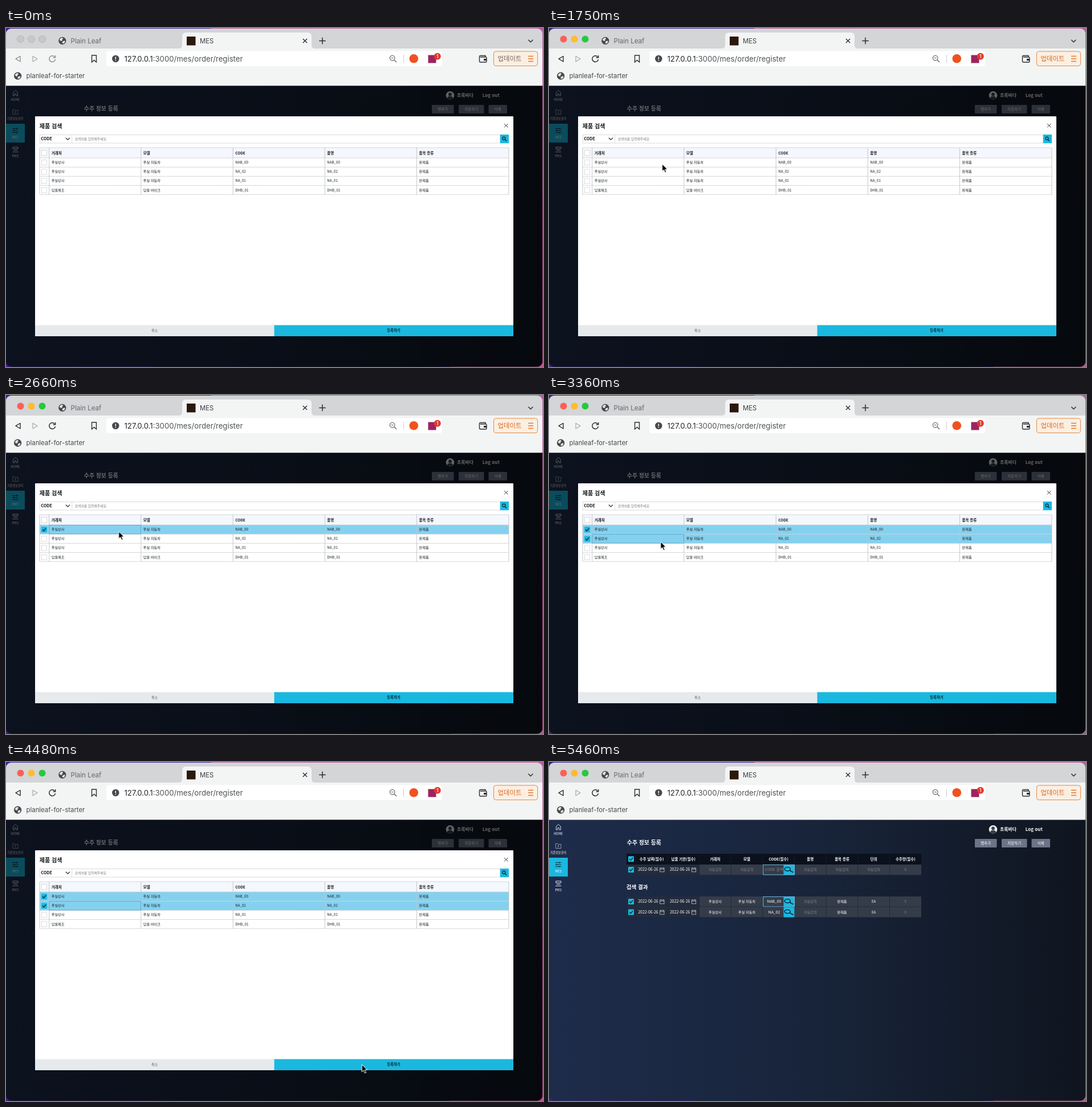
Write an HTML page that moves like this. It is 942 px wide and 595 px high and loops after 5.53 s.

```html
<!DOCTYPE html>
<html lang="ko">
<head>
<meta charset="utf-8">
<title>MES</title>
<style>
  html, body { margin: 0; width: 100%; height: 100%; overflow: hidden; background: #40208a; }
  svg { display: block; width: 942px; height: 595px; }
  text { font-family: "Noto Sans CJK KR", "Noto Sans CJK JP", "Noto Sans CJK", "Noto Sans", sans-serif; }
  .ui text { font-family: Inter, "Noto Sans CJK KR", "Noto Sans CJK JP", sans-serif; }
  .nav, .update, .idle, .modal, .row1, .row2, .focus1, .cursor {
    animation: 5530ms step-end infinite;
  }
  .nav { color: #2b2d30; animation-name: wake-nav; }
  .update { color: #d9681f; animation-name: wake-update; }
  .idle { opacity: 0; animation-name: idle; }
  .modal { opacity: 0; animation-name: modal; }
  .row1 { animation-name: pick1; }
  .row2 { animation-name: pick2; }
  .focus1 { opacity: 0; animation-name: focus1; }
  .cursor { animation-name: move; }
  @keyframes wake-nav { 0% { color: #909295; } 1.26% { color: #2b2d30; } }
  @keyframes wake-update { 0% { color: #75675c; } 1.26% { color: #d9681f; } }
  @keyframes idle { 0% { opacity: 1; } 1.26% { opacity: 0; } }
  @keyframes modal { 0% { opacity: 1; } 82.27% { opacity: 0; } }
  @keyframes pick1 { 0% { opacity: 0; } 34.17% { opacity: 1; } }
  @keyframes pick2 { 0% { opacity: 0; } 56.95% { opacity: 1; } }
  @keyframes focus1 { 0% { opacity: 0; } 34.17% { opacity: 1; } 56.95% { opacity: 0; } }
  /* the pointer advances once every 70 ms */
  @keyframes move {
    0% { transform: translate(400px, 610px); }
    18.98% { transform: translate(400px, 610px); animation-timing-function: steps(4, jump-start); }
    24.05% { transform: translate(203px, 244px); }
    25.31% { transform: translate(203px, 244px); animation-timing-function: steps(3, jump-start); }
    29.11% { transform: translate(198.5px, 238.7px); }
    34.17% { transform: translate(198px, 237px); }
    48.09% { transform: translate(198px, 237px); animation-timing-function: steps(6, jump-start); }
    55.69% { transform: translate(196px, 252px); }
    56.95% { transform: translate(196px, 252px); animation-timing-function: steps(4, jump-start); }
    62.02% { transform: translate(195.8px, 257.6px); }
    64.55% { transform: translate(195.8px, 257.6px); animation-timing-function: steps(5, jump-start); }
    70.88% { transform: translate(560px, 517px); }
    74.68% { transform: translate(560px, 517px); animation-timing-function: steps(4, jump-start); }
    79.74% { transform: translate(624.3px, 531px); }
    88.6% { transform: translate(627px, 538px); }
    89.87% { transform: translate(629px, 546px); }
    91.13%, 100% { transform: translate(629px, 620px); }
  }
</style>
</head>
<body>
<svg id="stage" viewBox="0 0 942 595"></svg>
<script>
const CYAN = '#1ab8df', INK = '#2b2d30';

const box = (x, y, w, h, fill, more = '') =>
  `<rect x="${x}" y="${y}" width="${w}" height="${h}" fill="${fill}" ${more}/>`;
const dot = (x, y, r, fill, more = '') =>
  `<circle cx="${x}" cy="${y}" r="${r}" fill="${fill}" ${more}/>`;
const line = (d, color, width = 1, more = '') =>
  `<path d="${d}" fill="none" stroke="${color}" stroke-width="${width}" ${more}/>`;
const text = (x, y, size, str, fill, weight = 400, more = '') =>
  `<text x="${x}" y="${y}" font-size="${size}" fill="${fill}" font-weight="${weight}" ${more}>${str}</text>`;
const mid = (x, y, size, str, fill, weight) =>
  text(x, y, size, str, fill, weight, 'text-anchor="middle"');
const group = (name, body) => `<g class="${name}">${body}</g>`;
const cross = (x, y, r, color, width) =>
  line(`M${x - r} ${y - r}l${2 * r} ${2 * r}m0 ${-2 * r}l${-2 * r} ${2 * r}`, color, width);
const checked = (x, y) => box(x, y, 10, 10, CYAN, 'rx="1"') +
  line(`M${x + 2} ${y + 5}l2.2 2.3 4-4.6`, '#123', 1.3);
const globe = (x, y) => dot(x, y, 6.6, '#45484c') +
  `<path d="M${x - 5} ${y - 1}q1-4 5-4.2l1.5 2-2 1 .5 2-2 1zM${x + 1} ${y + 1}l3.5-1q1 3-2.5 5l-2.5-1z" fill="#e4e5e6"/>`;

function browser() {
  const lights = ['#ff5f57', '#febc2e', '#28c840'];
  const xs = [25.5, 44.5, 63.5];
  const nav = line('M25 49.5v9.5l-8-4.8z', 'currentColor', 1.4, 'stroke-linejoin="round"') +
    line('M85.3 50.6a5.4 5.4 0 1 0 1.2 4.6M86.6 48v4h-4', 'currentColor', 1.5);
  const update =
    box(855.5, 41, 77, 25.5, '#fcefe2', 'rx="4" stroke="#e08a45"') +
    text(862.5, 58, 11.4, '업데이트', 'currentColor', 500) +
    line('M916 49.5h9M916 54h9M916 58.5h9', '#dd7a32', 1.3);
  return group('ui',
    box(0, 0, 942, 36, '#d3d5d7') + box(0, 36, 942, 66, '#f3f4f4') +
    `<path d="M303 36q6 0 6-6V15q0-7 7-7h213q7 0 7 7v15q0 6 6 6z" fill="#f3f4f4"/>` +
    xs.map((x, i) => dot(x, 19.5, 6, lights[i])).join('') +
    group('idle', xs.map(x => dot(x, 19.5, 6, '#c7c8ca', 'stroke="#b5b7b9" stroke-width=".8"')).join('')) +
    globe(98.8, 22.3) + text(113.5, 26.5, 11.6, 'Plain Leaf', '#66696d') +
    box(317, 15, 15.5, 15.5, '#2a180b') + text(340, 26.5, 11.3, 'MES', '#3c3e42') +
    cross(524.5, 22.5, 3.6, INK, 1.4) +
    line('M549.3 22.5h11.4M555 16.8v11.4', INK, 1.5) +
    line('M916.3 20.7l4 4 4-4', INK, 1.5) +
    group('nav', nav) +
    line('M47 49.5v9.5l8-4.8z', '#a6a8ab', 1.2, 'stroke-linejoin="round"') +
    line('M150.5 48h8v12l-4-3.6-4 3.6z', INK, 1.4) +
    box(176, 40.5, 589, 26.5, '#fff', 'rx="4"') +
    dot(192.3, 54, 6.2, '#46494d') + line('M192.3 50.5v4.3M192.3 56v1.6', '#fff', 1.5) +
    text(207.5, 58.8, 13.2, '127.0.0.1<tspan fill="#4f5256">:3000/mes/order/register</tspan>', '#222427') +
    dot(677.7, 52.8, 4.3, 'none', 'stroke="#55585c" stroke-width="1.1"') +
    line('M681 56l4 4M675.6 52.8h4.2', '#55585c', 1.1) +
    line('M697.5 47v14', '#c9cbcd') +
    dot(715.3, 53.7, 7.8, '#f0521f') +
    box(740.5, 47.5, 14, 14, '#9c2460') +
    dot(756.8, 49.8, 6, '#e2382f') + mid(756.8, 53, 8.5, '1', '#fff', 500) +
    line('M830.5 50.5q0-2 2-2h8.5v2.5M830.5 50.5v7.5q0 2 2 2h9q1.5 0 1.5-1.5v-6q0-1.5-1.5-1.5h-9.5', INK, 1.4) +
    box(838, 54, 5, 3.2, INK) +
    group('update', update) +
    globe(20.6, 84.2) + text(35.5, 88, 11.4, 'planleaf-for-starter', '#46494d'));
}

function sidebar() {
  const label = (y, size, str) => mid(16.3, y, size, str, '#fff', 500);
  return box(0, 168, 33, 33, CYAN) +
    line('M12.5 119v-6l4-3.5 4 3.5v6h-2.6v-3.5h-2.8v3.5z', '#dfe3ea', .9) +
    line('M11.8 143.2h3.2l1 1.3h5v7h-9.2zM16.4 146v4M15.4 147h2', '#aeb6c4', .8) +
    line('M11 176.5h10.5M11 180h10.5M11 183.5h10.5M18.5 175v3M14 178.5v3M18 182v3', '#0e2a3d', .9) +
    line('M12 209h9v3h-9zM13 214.5h7M11.5 217.5h10', '#dfe3ea', 1) +
    label(128.3, 5.6, 'HOME') + label(161.3, 5.2, '기준정보관리') +
    label(194.2, 5.6, 'MES') + label(227.2, 5.6, 'PMS');
}

const colX = i => 152.3 + i * 55.65;
const colMid = i => colX(i) + 27.8;

function orderRow(y, h, cells, focused) {
  const date = x => text(x, y + 11.2, 6.9, '2022-06-26', '#fff', 500) +
    box(x + 38.3, y + 6.2, 7.4, 6.6, 'none', 'stroke="#c3c8d0" stroke-width=".8"') +
    line(`M${x + 38.3} ${y + 8.2}h7.4M${x + 40} ${y + 5}v2M${x + 44} ${y + 5}v2`, '#c3c8d0', .8);
  const base = y + 11;
  let out = box(136, y, 517, h, '#353c49') + box(136, y, 128, h, '#232c3d') + checked(139, y + 4);
  for (let i = 0; i < 9; i++) out += line(`M${colX(i)} ${y}v${h}`, '#1f2837', .8);
  out += line(`M136 ${y + h - .4}h517`, '#1f2837', .8) + date(156.3) + date(212);
  cells.forEach((str, i) => {
    const muted = /자동입력|검색|^0$/.test(str);
    const x = i === 2 ? 395 : colMid(i + 2);
    out += mid(x, base, i === 2 ? 6.8 : 6.2, str, muted ? '#7c828d' : '#fff', muted ? 400 : 500);
  });
  out += box(411.5, y, 19, h - .5, CYAN) +
    `<ellipse cx="418.3" cy="${y + 8}" rx="5" ry="3.2" fill="none" stroke="#0f2836" stroke-width="1.5"/>` +
    line(`M422 ${y + 10.2}l6.6 3.6`, '#0f2836', 1.8);
  if (focused) out += box(375.7, y + .4, 54.8, h - 1, 'none', 'stroke="#6cbbe2"');
  return out;
}

function page() {
  const heads = ['수주 날짜(필수)', '납품 기한(필수)', '거래처', '모델', 'CODE(필수)', '품명', '품목 종류', '단위', '수주량(필수)'];
  const button = (x, w, str) => box(x, 135, w, 15, '#6c7588', 'rx="1"') +
    mid(x + w / 2, 144.9, 6.5, str, '#fff', 500);
  const auto = '자동입력';
  const found = code => ['푸실상사', '푸실 자동차', code, auto, '완제품', 'EA', '0'];
  return box(0, 101.5, 942, 494, 'url(#night)') + sidebar() +
    dot(779, 118.3, 7.3, '#eceef0') + dot(779, 116.5, 2.9, '#3a4048') +
    `<path d="M773.8 123.4q.4-3.6 5.2-3.6t5.2 3.6a7.3 7.3 0 0 1-10.4 0z" fill="#3a4048"/>` +
    text(791, 121.2, 7.9, '초록바다', '#fff', 700) + text(835.8, 121.2, 8, 'Log out', '#fff', 600) +
    button(747, 38.5, '행추가') + button(794, 44.5, '저장하기') + button(846.5, 32.5, '삭제') +
    text(136.8, 144.8, 9.9, '수주 정보 등록', '#fff', 700) +
    text(135.8, 223.3, 9.5, '검색 결과', '#fff', 700) +
    box(136, 161, 517, 19, '#0b111c') + checked(139, 165.3) +
    heads.map((str, i) => mid(colMid(i), 172.7, 6.5, str, '#fff', 700) +
      line(`M${colX(i)} 161v19`, '#182131', .7)).join('') +
    orderRow(180, 18.5, [auto, auto, 'CODE 검색', auto, auto, auto, '0'], true) +
    orderRow(236, 18.5, found('NAB_00'), true) +
    orderRow(254.5, 18.5, found('NA_02'), false);
}

function modal() {
  const lines = [59, 75.7, 236.8, 398.2, 559.3, 720.5, 882];
  const tops = [228, 244.2, 260.3, 276.4];
  const heads = ['거래처', '모델', 'CODE', '품명', '품목 종류'];
  const product = (maker, model, code, kind) => [maker, model, code, code, kind];
  const rows = [
    product('푸실상사', '푸실 자동차', 'NAB_00', '완제품'),
    product('푸실상사', '푸실 자동차', 'NA_02', '완제품'),
    product('푸실상사', '푸실 자동차', 'NA_01', '반제품'),
    product('담울제조', '담울 바이크', 'DHB_01', '완제품')
  ];
  const empty = y => box(62.5, y, 9.2, 9.2, '#fff', 'stroke="#cfd2d6" stroke-width=".8"');
  const fill = i => box(59, tops[i], 823, 16.1, '#84d1ef') + checked(62, tops[i] + 3.2);
  const ring = i => box(76, tops[i] + .4, 160.5, 15.4, 'none', 'stroke="#5aa5cf" stroke-width=".9"');
  const write = (cells, y, size, weight) => cells.map((str, i) =>
    text(lines[i + 1] + 4, y, size, str, '#1c1e21', weight)).join('');
  return box(0, 101.5, 942, 494, '#000', 'opacity=".59"') +
    box(51, 155, 839, 386, '#fff', 'rx="1"') +
    text(58.8, 175.8, 10, '제품 검색', '#15171a', 700) + cross(877.3, 171.3, 3.2, '#333', 1) +
    box(59.4, 187.4, 808, 14.6, '#fff', 'stroke="#cfd2d6" stroke-width=".8"') +
    text(61.2, 197.2, 7.3, 'CODE', '#15171a', 700) +
    line('M104.8 192.8l3.6 3.4 3.6-3.4', INK, 1.2) + line('M115.7 187.4v14.6', '#cfd2d6', .8) +
    text(120.8, 196.7, 5.8, '검색어를 입력해주세요.', '#777a7f') +
    box(866.7, 187, 15.3, 15.3, CYAN) +
    dot(873.4, 193.7, 2.5, 'none', 'stroke="#0d2735" stroke-width="1.2"') +
    line('M875.2 195.6l2.8 2.8', '#0d2735', 1.4) +
    box(59, 210, 823, 18, '#f4f7fd') + empty(214.7) + tops.map(y => empty(y + 3.6)).join('') +
    group('row1', fill(0)) + group('row2', fill(1)) +
    [210, ...tops, 292.3].map(y => line(`M59 ${y}h823`, '#cfd2d6', .9)).join('') +
    lines.map(x => line(`M${x} 210v82.3`, '#bfc3c8', .9)).join('') +
    group('focus1', ring(0)) + group('row2', ring(1)) +
    write(heads, 221.7, 6.5, 700) +
    rows.map((cells, i) => write(cells, tops[i] + 10.1, 6.2, 500)).join('') +
    box(51, 521.5, 419.5, 19.5, '#e7eaed') + box(470.5, 521.5, 419.5, 19.5, CYAN) +
    mid(260.7, 533.4, 6.2, '취소', '#55585c', 400) + mid(680, 533.4, 6.4, '등록하기', '#0c2430', 700);
}

const desktop = box(0, 0, 942, 595, '#40208a') +
  box(360, 0, 582, 300, '#b55f9e') + box(780, 300, 162, 295, '#b8568c');

const pointer = '<path d="M0 0v12.8l2.9-2.7 2.2 5 2.3-1-2.2-4.8h4.1z" fill="#000" stroke="#fff" stroke-linejoin="round"/>';

document.getElementById('stage').innerHTML = `
  <defs>
    <linearGradient id="night">
      <stop offset="0" stop-color="#1e2c4b"/>
      <stop offset=".5" stop-color="#18243a"/>
      <stop offset="1" stop-color="#0f151f"/>
    </linearGradient>
    <clipPath id="frame"><rect x="0" y="1" width="941" height="593.5" rx="9"/></clipPath>
  </defs>
  ${desktop}
  <g clip-path="url(#frame)">${browser()}${page()}${group('modal', modal())}</g>
  ${group('cursor', pointer)}`;
</script>
</body>
</html>
```
